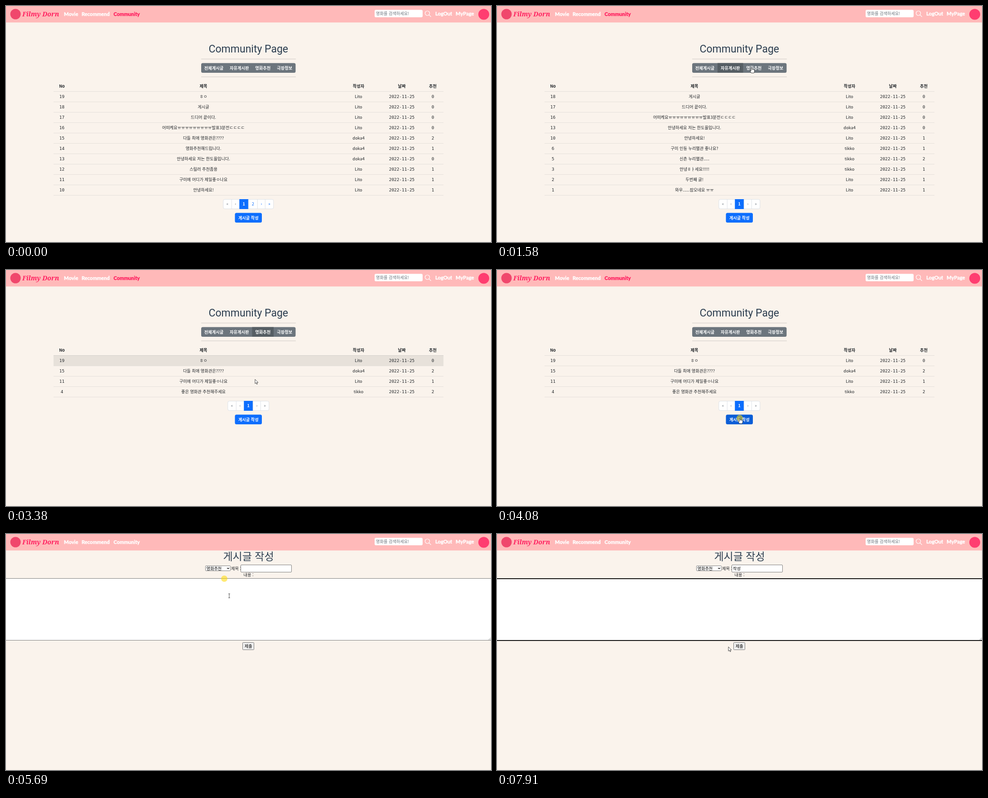
Animation of 1071 by 523 pixels, one loop 8000 ms. Source, as an HTML page:

```html
<!DOCTYPE html>
<html lang="ko">
<head>
<meta charset="utf-8">
<title>Community Page</title>
<style>
  html, body { margin: 0; width: 100%; height: 100%; overflow: hidden; background: #faf3ec; }
  svg { display: block; width: 1071px; height: 523px; }
  text { font: 9.2px "Noto Sans CJK KR", "Noto Sans", sans-serif; fill: #212529; white-space: pre; }
  .mid { text-anchor: middle; }
  .bold { font-weight: 700; }
  .num { font: 9.4px "DejaVu Sans Mono", monospace; }
  .nav { font: 700 11.2px Lato, sans-serif; fill: #fff; stroke: #fff; stroke-width: .45px; }
  .nav.on { fill: #ff1f5f; stroke: #ff1f5f; }
  .brand { font: italic 700 14.2px "Noto Serif", serif; fill: #ff1f5f; }
  .title { font: 23px Roboto, sans-serif; fill: #2c3e50; }
  .head { font-size: 23px; fill: #2c3e50; }
  .white { fill: #fff; }
  .ink { fill: #000; }
  .grey { fill: #6c757d; }
  .blue { fill: #0d6efd; }
  .btn { fill: #0d6efd; }
  .btn.hover { fill: #0b5ed7; }
  .tab { fill: transparent; }
  .tab.hover { fill: #5c636a; }
  .tab.on { fill: #565e64; }
  .row { fill: #000; fill-opacity: 0; }
  .row.hover { fill-opacity: .075; }
  .field { fill: #fff; stroke: #7d7d7d; }
  .field.focus { stroke: #101010; stroke-width: 2px; shape-rendering: crispEdges; }
</style>
</head>
<body>
<svg id="stage" viewBox="0 0 1071 523"></svg>
<script>
const NS = 'http://www.w3.org/2000/svg';
const stage = document.getElementById('stage');

function el(parent, tag, attrs = {}, content) {
  const node = document.createElementNS(NS, tag);
  for (const key in attrs) node.setAttribute(key, attrs[key]);
  if (content !== undefined) node.textContent = content;
  return parent.appendChild(node);
}
const text = (g, x, y, str, cls = '') => el(g, 'text', { x, y, class: cls }, str);
const mid = (g, x, y, str, cls = '') => text(g, x, y, str, 'mid ' + cls);
const rect = (g, x, y, width, height, attrs = {}) => el(g, 'rect', { x, y, width, height, ...attrs });
const path = (g, d, attrs = {}) => el(g, 'path', { d, ...attrs });
const show = (node, on) => node.setAttribute('display', on ? 'inline' : 'none');
const inside = (p, x0, y0, x1, y1) => p.x >= x0 && p.x < x1 && p.y >= y0 && p.y < y1;

// Navigation bar
rect(stage, 0, 0, 1071, 36.5, { fill: '#ffb9b9' });
el(stage, 'circle', { cx: 21, cy: 18, r: 11.5, fill: '#f0476c' });
text(stage, 36, 22.5, 'Filmy Dorn', 'brand');
text(stage, 128, 21.5, 'Movie', 'nav');
text(stage, 167, 21.5, 'Recommend', 'nav');
const communityLink = text(stage, 237.5, 21.5, 'Community', 'nav');
rect(stage, 814, 8.5, 106, 16.5, { rx: 3, fill: '#fff' });
text(stage, 817, 20, '영화를 검색하세요!', 'grey');
path(stage, 'M935.5 16a5 5 0 1 0-10 0a5 5 0 1 0 10 0M934.2 19.7l4.3 4.3',
  { fill: 'none', stroke: '#fff', 'stroke-width': 1.2 });
text(stage, 948, 20.5, 'LogOut', 'nav');
text(stage, 993, 20.5, 'MyPage', 'nav');
el(stage, 'circle', { cx: 1055, cy: 18.5, r: 12, fill: '#ff3d70' });

// Community page
const POSTS = {
  19: ['ㅎㅇ', 'Lito', 0],
  18: ['게시글', 'Lito', 0],
  17: ['드디어 끝이다.', 'Lito', 0],
  16: ['어떠케요' + 'ㅠ'.repeat(9) + '발표3분전ㄷㄷㄷㄷ', 'Lito', 0],
  15: ['다들 최애 영화관은????', 'doka4', 2],
  14: ['영화추천해드립니다.', 'doka4', 1],
  13: ['안녕하세요 저는 한도율입니다.', 'doka4', 0],
  12: ['스릴러 추천좀용', 'Lito', 1],
  11: ['구미에 어디가 제일좋ㅇ나요', 'Lito', 1],
  10: ['안녕하세요!', 'Lito', 1],
  6: ['구미 인동 누리별관 좋나요?', 'tikko', 1],
  5: ['신촌 누리별관.....', 'tikko', 2],
  4: ['좋은 영화관 추천해주세요', 'tikko', 2],
  3: ['안녕ㅎㅏ세요!!!!!', 'tikko', 1],
  2: ['두번째 글!', 'Lito', 1],
  1: ['와우......잠오네요 ㅠㅠ', 'Lito', 1]
};
const TOP = 189, ROW = 23, CX = 535.3;
const COLS = [123.5, 436, 778.5, 874, 942.5];

const community = el(stage, 'g');
mid(community, CX, 102.5, 'Community Page', 'title');
for (const y of [117, 156.5]) rect(community, 431, y, 209, 1, { fill: '#d0cac5' });
rect(community, 431, 126.5, 208.5, 21.5, { rx: 3.5, fill: '#6c757d' });
const EDGES = [431, 487, 543.5, 591, 639.5];
const tabs = ['전체게시글', '자유게시판', '영화추천', '극장정보'].map((label, i) => {
  const w = EDGES[i + 1] - EDGES[i];
  const tab = rect(community, EDGES[i], 126.5, w, 21.5, { class: 'tab' });
  mid(community, EDGES[i] + w / 2, 140.5, label, 'white bold');
  return tab;
});
['No', '제목', '작성자', '날짜', '추천'].forEach((h, i) => mid(community, COLS[i], 181, h, 'bold'));
rect(community, 105, TOP, 861, 1, { fill: '#e3deda' });

function pager(g, y, pages) {
  const labels = ['«', '‹', ...Array.from({ length: pages }, (_, i) => String(i + 1)), '›', '»'];
  const widthOf = s => ({ '«': 18.5, '»': 18.5, '‹': 17, '›': 17 }[s] || 20);
  const total = labels.reduce((sum, s) => sum + widthOf(s), 0);
  let x = CX - total / 2;
  rect(g, x, y, total, 21, { rx: 3.5, fill: '#fff', stroke: '#dee2e6' });
  labels.forEach((s, i) => {
    const w = widthOf(s), active = s === '1';
    if (active) rect(g, x, y - .5, w, 22, { fill: '#0d6efd' });
    else if (i) rect(g, x - .5, y, 1, 21, { fill: '#dee2e6' });
    const tone = active ? 'white bold' : pages > 1 && i > 2 ? 'blue' : 'grey';
    mid(g, x + w / 2, y + 13.5, s, tone);
    x += w;
  });
}

function board(ids, pages) {
  const g = el(community, 'g');
  const rows = ids.map((id, i) => {
    const y = TOP + i * ROW, [title, author, likes] = POSTS[id];
    const row = rect(g, 105, y, 861, ROW, { class: 'row' });
    rect(g, 105, y + ROW, 861, 1, { fill: '#e5e0db' });
    const cells = [id, title, author, '2022-11-25', likes];
    cells.forEach((c, k) => mid(g, COLS[k], y + 15, c, k === 1 || k === 2 ? '' : 'num'));
    return row;
  });
  const end = TOP + ids.length * ROW;
  pager(g, end + 9.5, pages);
  const button = rect(g, 505.5, end + 39.5, 59.5, 21.5, { rx: 3.5, class: 'btn' });
  mid(g, CX, end + 53.5, '게시글 작성', 'white bold');
  return { g, rows, button, end };
}
const boards = [
  board([19, 18, 17, 16, 15, 14, 13, 12, 11, 10], 2),
  board([18, 17, 16, 13, 10, 6, 5, 3, 2, 1], 1),
  board([19, 15, 11, 4], 1)
];

// Writing form
const form = el(stage, 'g');
mid(form, 535.5, 58, '게시글 작성', 'head');
rect(form, 440.5, 70.5, 55, 11, { rx: 1, class: 'field' });
const choice = text(form, 442.5, 79.5, '', 'ink');
path(form, 'M488.3 75l2.2 2.2l2.2-2.2', { fill: 'none', stroke: '#111', 'stroke-width': 1.3 });
text(form, 497, 79.5, '제목 :');
const input = rect(form, 518.5, 68.5, 112, 16, { rx: 1.5, class: 'field' });
const typed = text(form, 521, 79.5, '', 'ink');
const caret = rect(form, 0, 71, 1, 10.5, { fill: '#111' });
mid(form, 535.5, 94, '내용 :');
const area = rect(form, -4.5, 98.5, 1080, 137, { class: 'field' });
path(form, 'M1065.5 235l5-5M1068.5 235l2-2', { stroke: '#888', 'stroke-width': .8 });
rect(form, 522.5, 240.5, 25, 16, { rx: 1, fill: '#efefef', stroke: '#767676' });
mid(form, 535.3, 251.5, '제출', 'ink');

const menu = el(form, 'g');
rect(menu, 440.5, 82.5, 55, 38, { fill: '#fff', stroke: '#767676' });
const options = ['자유게시판', '영화추천', '극장정보'].map((label, i) => ({
  bar: rect(menu, 441, 83 + i * 12.4, 54, 12.4, { fill: '#1967d2' }),
  label: text(menu, 442.5, 92.5 + i * 12.4, label)
}));

// Pointer
const ring = el(stage, 'circle', { r: 7, fill: '#ffd800', 'fill-opacity': .55 });
const pointer = el(stage, 'g');
const line = { fill: '#fff', stroke: '#222', 'stroke-width': .8, 'stroke-linejoin': 'round' };
const shapes = {
  arrow: path(pointer, 'M0 0V9.5L2.2 7.5L3.8 11L5.3 10.3L3.8 7H6.8Z', line),
  hand: path(pointer, 'M-1 1Q0-.6 1 1V4.6Q2 3.7 3 4.8Q4 4 5 5.2Q6.4 4.8 6.6 6.4V9L5.4 12.5H-.4L-3 8.2Q-3.4 6.6-1 7.6Z', line),
  beam: path(pointer, 'M-1.8-4.5H1.8M0-4.5V4.5M-1.8 4.5H1.8', { ...line, fill: 'none' })
};

// [time, x, y] stops of the pointer
const ROUTE = [
  [50, 572, 476], [300, 556, 350], [560, 520, 160], [650, 514, 121], [720, 515, 134],
  [1300, 515, 134], [1580, 562, 136], [1700, 566, 134],
  [3000, 566, 134], [3380, 550, 242], [3740, 536, 328],
  [4330, 536, 328], [4600, 500, 140], [4830, 480, 74],
  [5080, 480, 74], [5380, 482, 99],
  [5650, 482, 99], [5800, 522, 238], [6030, 539, 82],
  [7390, 539, 82], [7580, 526, 160], [7720, 526, 160], [7910, 511, 250]
];
const CLICKS = [900, 1740, 4040, 4890, 5590, 7600];
const KEYS = [[6660, 'ㅈ'], [6710, '자'], [6770, '작'], [6930, '작ㅅ'], [7000, '작서'], [7080, '작성']];
const LAG = 150, PRESS = 110, LOOP = 8000;

function pointerAt(t) {
  const i = ROUTE.findIndex(stop => stop[0] > t);
  if (i === 0) return { x: ROUTE[0][1], y: ROUTE[0][2] };
  if (i < 0) return { x: ROUTE.at(-1)[1], y: ROUTE.at(-1)[2] };
  const [t0, x0, y0] = ROUTE[i - 1], [t1, x1, y1] = ROUTE[i];
  const k = (t - t0) / (t1 - t0);
  return { x: x0 + (x1 - x0) * k, y: y0 + (y1 - y0) * k };
}

function drawCommunity(t, late) {
  const current = t < 1100 ? 0 : t < 1960 ? 1 : 2;
  const focused = t < 900 ? -1 : t < 1740 ? 1 : t < 4040 ? 2 : -1;
  tabs.forEach((tab, i) => {
    const over = t > 50 && inside(late, EDGES[i], 126.5, EDGES[i + 1], 148);
    tab.classList.toggle('hover', over);
    tab.classList.toggle('on', i === focused);
  });
  boards.forEach((b, i) => show(b.g, i === current));
  const b = boards[current];
  b.rows.forEach((row, i) => {
    const y = TOP + i * ROW;
    row.classList.toggle('hover', t > 50 && inside(late, 105, y, 966, y + ROW));
  });
  b.button.classList.toggle('hover', t > 50 && inside(late, 505, b.end + 39, 565, b.end + 61));
  return b;
}

function drawForm(t, p) {
  const open = t >= 4970 && t < 5620;
  show(menu, open);
  const pick = p.y > 95 ? 1 : 0;
  options.forEach((o, i) => {
    show(o.bar, i === pick);
    o.label.classList.toggle('white', i === pick);
  });
  choice.textContent = t < 5620 ? '자유게시판' : '영화추천';
  const typing = t >= 6010 && t < 7620;
  input.classList.toggle('focus', typing);
  area.classList.toggle('focus', t >= 7620);
  typed.textContent = KEYS.reduce((s, [at, str]) => t >= at ? str : s, '');
  show(caret, typing);
  caret.setAttribute('x', 521 + typed.textContent.length * 8.4);
  return open;
}

function draw(t) {
  const p = pointerAt(t);
  const onForm = t >= 4240;
  communityLink.classList.toggle('on', !onForm);
  show(community, !onForm);
  show(form, onForm);

  let kind = 'arrow';
  if (onForm) {
    const open = drawForm(t, p);
    const writable = inside(p, 0, 98, 1071, 236) || inside(p, 518, 68, 631, 85);
    if (writable && !open) kind = 'beam';
  } else {
    const b = drawCommunity(t, pointerAt(t - LAG));
    if (inside(p, 431, 126, 640, 148) || inside(p, 505, b.end + 39, 565, b.end + 61)) kind = 'hand';
  }
  for (const name in shapes) show(shapes[name], name === kind);
  show(pointer, t >= 50);
  pointer.setAttribute('transform', `translate(${p.x} ${p.y})`);

  const click = CLICKS.find(c => t >= c && t < c + PRESS);
  show(ring, click !== undefined);
  if (click !== undefined) {
    const spot = pointerAt(click);
    ring.setAttribute('cx', spot.x);
    ring.setAttribute('cy', spot.y);
  }
}

const start = performance.now();
function tick() {
  draw((performance.now() - start) % LOOP);
  requestAnimationFrame(tick);
}
tick();
</script>
</body>
</html>
```
